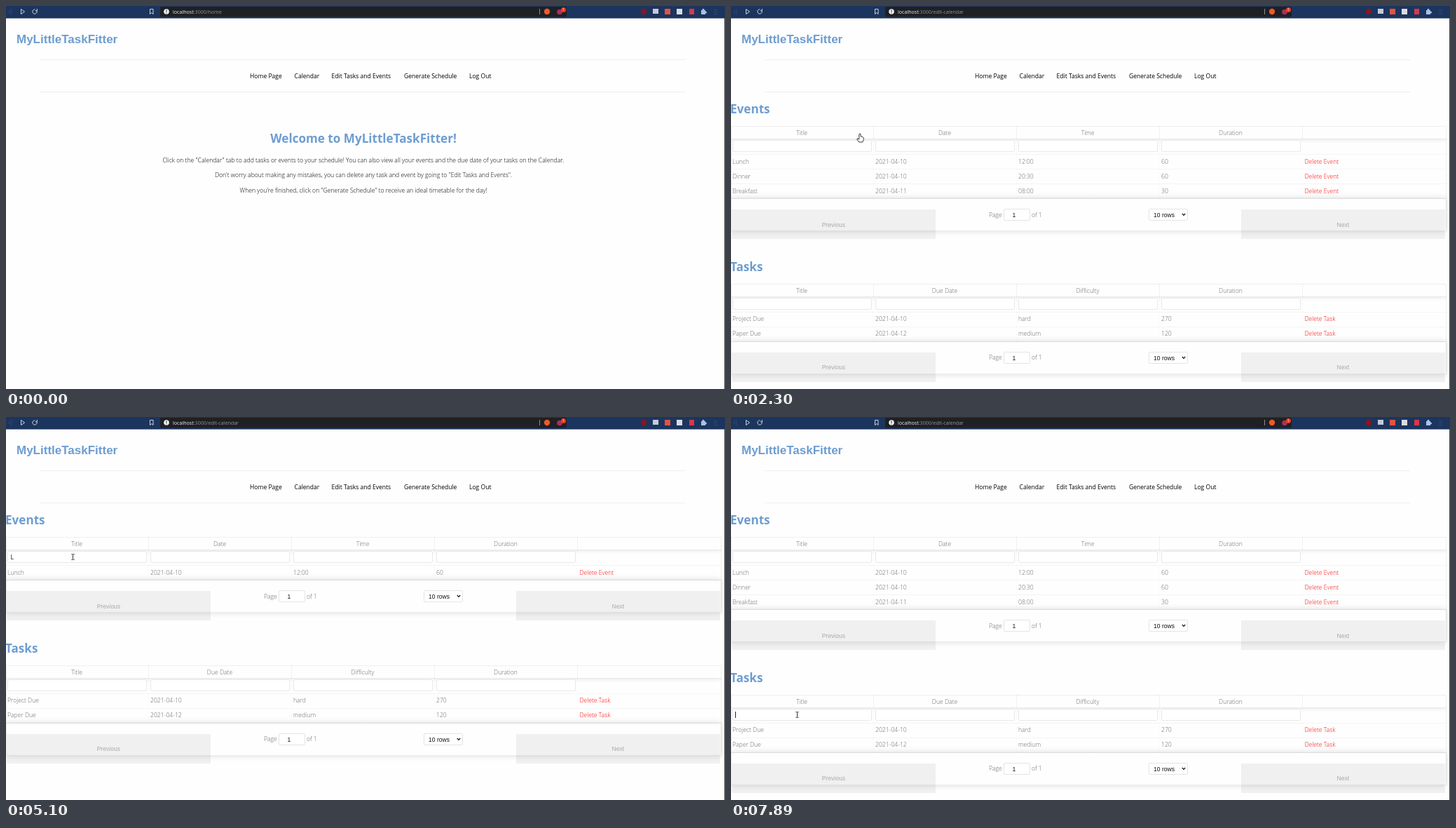
Recreate the animation shown at these times as an HTML page with a canvas. Size 1026x546 px, loop 8000 ms.

```html
<!DOCTYPE html>
<html lang="en">
<head>
<meta charset="utf-8">
<title>Scheduler</title>
<style>
  html, body { margin: 0; width: 100%; height: 100%; overflow: hidden; background: #fefefe; }
  canvas { display: block; width: 1026px; height: 546px; }
</style>
</head>
<body>
<canvas id="stage" width="1026" height="546"></canvas>
<script>
const ctx = document.getElementById('stage').getContext('2d');
const LOOP = 8000;
const BRAND = 'MyLittleTaskFitter';
const BLUE = '#6d9dd1', PAGE = '#fefefe', GREY = '#666';
const REGULAR = '8.55px "Open Sans", sans-serif';
const LIGHT = '300 8.6px "Open Sans", sans-serif';
const PARAGRAPH = '300 8.63px "Open Sans", sans-serif';
const HEADING = 'bold 17.1px "Open Sans", sans-serif';
const CONTROL = '8.55px "Liberation Sans", Arial, sans-serif';
const URL_FONT = '7.1px "Open Sans", sans-serif';
const COLS = [0, 204, 408, 612, 816];

const NAV = [
  ['Home Page', 348], ['Calendar', 411.5], ['Edit Tasks and Events', 464.5],
  ['Generate Schedule', 568], ['Log Out', 661]
];
const EVENTS = {
  heads: ['Title', 'Date', 'Time', 'Duration'],
  action: 'Delete Event',
  rows: [
    ['Lunch', '2021-04-10', '12:00', '60'],
    ['Dinner', '2021-04-10', '20:30', '60'],
    ['Breakfast', '2021-04-11', '08:00', '30']
  ]
};
const TASKS = {
  heads: ['Title', 'Due Date', 'Difficulty', 'Duration'],
  action: 'Delete Task',
  rows: [
    ['Project Due', '2021-04-10', 'hard', '270'],
    ['Paper Due', '2021-04-12', 'medium', '120']
  ]
};

// time, filter text, caret visible
const TYPING = [
  [0, '', 0], [3080, '', 1], [3620, '', 0], [3940, 'L', 1], [4170, 'Lu', 1],
  [4330, 'Lun', 1], [4400, 'Lunc', 1], [4790, 'Lun', 1], [4950, 'Lu', 0],
  [5100, 'L', 0], [5260, '', 0], [5490, 'B', 1], [5720, 'Br', 1],
  [5800, 'Bre', 1], [6030, 'Br', 1], [6190, 'B', 0], [6340, '', 0],
  [6890, '', 1], [7420, '', 0]
];

// start, end, steps, then three points of a curve
const MOVES = [
  [220, 820, 9, [1018, 538], [700, 190], [502, 91]],
  [1760, 2060, 5, [502, 91], [330, 150], [184, 185]],
  [2300, 2300, 1, [184, 185], [184, 183], [184, 182]],
  [2450, 2760, 5, [184, 182], [140, 196], [96, 197]],
  [3080, 3150, 2, [96, 197], [98, 196], [95, 199]],
  [7190, 7890, 10, [95, 199], [143, 500], [94, 424]]
];

function rect(x, y, w, h, color) {
  ctx.fillStyle = color;
  ctx.fillRect(x, y, w, h);
}
function frame(x, y, w, h, color, radius = 0) {
  ctx.beginPath();
  ctx.roundRect(x + .5, y + .5, w - 1, h - 1, radius);
  ctx.lineWidth = 1;
  ctx.strokeStyle = color;
  ctx.stroke();
}
function disc(x, y, r, color) {
  ctx.beginPath();
  ctx.arc(x, y, r, 0, Math.PI * 2);
  ctx.fillStyle = color;
  ctx.fill();
}
function line(points, color, width = 1, close = false, fill = null) {
  ctx.beginPath();
  points.forEach(([x, y]) => ctx.lineTo(x, y));
  if (close) ctx.closePath();
  if (fill) { ctx.fillStyle = fill; ctx.fill(); }
  ctx.lineWidth = width;
  ctx.strokeStyle = color;
  ctx.stroke();
}
function text(str, x, y, font, color, align = 'left') {
  ctx.font = font;
  ctx.fillStyle = color;
  ctx.textAlign = align;
  ctx.fillText(str, x, y);
}
function withShadow(blur, dy, alpha, draw) {
  ctx.save();
  ctx.shadowColor = `rgba(0,0,0,${alpha})`;
  ctx.shadowBlur = blur;
  ctx.shadowOffsetY = dy;
  draw();
  ctx.restore();
}

function drawBrowser(path) {
  rect(0, 0, 1026, 17.6, '#1c355e');
  line([[8, 4.5], [3.5, 8], [8, 11.5]], '#2f4872', 1, true);
  line([[21.5, 4.5], [26.5, 8], [21.5, 11.5]], '#c9d2e2', 1, true);
  ctx.beginPath();
  ctx.arc(41, 8, 3.2, -.5, 4.9);
  ctx.strokeStyle = '#c9d2e2';
  ctx.stroke();
  line([[44.4, 4], [44.4, 6.8], [41.8, 6.8]], '#c9d2e2');
  line([[205.5, 4.5], [210, 4.5], [210, 11.5], [207.8, 9.5], [205.5, 11.5]], '#c9d2e2', 1, true);

  ctx.beginPath();
  ctx.roundRect(220, 1, 580, 14.5, 2);
  ctx.fillStyle = '#1f2024';
  ctx.fill();
  disc(229, 8, 3.8, '#f2f2f2');
  rect(228.5, 5.5, 1, 3, '#1f2024');
  rect(228.5, 9.5, 1, 1, '#1f2024');
  text('localhost', 238, 10.6, URL_FONT, '#f0f0f0');
  const host = ctx.measureText('localhost').width;
  text(':3000' + path, 238 + host, 10.6, URL_FONT, '#929398');
  rect(761, 4, 1, 8, '#8d8e92');

  disc(772, 8, 4.2, '#f0582a');
  disc(790, 8.5, 3.8, '#a8305c');
  disc(795.5, 5.5, 3.5, '#f03c22');
  text('1', 795.5, 7.4, '5px "Open Sans", sans-serif', '#fff', 'center');

  disc(910, 8, 4, '#8c1420');
  rect(923, 4, 8, 7, '#c5cad7');
  rect(940, 4, 8, 8, '#e2533f');
  rect(957, 4, 8, 8, '#d9dce3');
  rect(975, 4, 7, 8, '#d7384a');
  rect(992, 6, 6, 6, '#a9c2e4');
  disc(995, 5.3, 1.5, '#a9c2e4');
  disc(998.5, 9, 1.5, '#a9c2e4');
  for (const y of [5, 8, 11]) rect(1010, y, 5, 1, '#304a74');
}

function drawHeader(hover) {
  text(BRAND, 15, 53, 'bold 17px "Liberation Sans", Arial, sans-serif', BLUE);
  rect(48, 76, 921, 1, '#eeeeee');
  rect(48, 122, 921, 1, '#eeeeee');
  if (hover) rect(456, 85, 103, 28, '#b8d6ea');
  for (const [label, x] of NAV) text(label, x, 102.8, REGULAR, '#000');
}

function drawHome() {
  text(`Welcome to ${BRAND}!`, 510, 195, HEADING, BLUE, 'center');
  [
    'Click on the "Calendar" tab to add tasks or events to your schedule! You can also view all your events and the due date of your tasks on the Calendar.',
    'Don\'t worry about making any mistakes, you can delete any task and event by going to "Edit Tasks and Events".',
    'When you\'re finished, click on "Generate Schedule" to receive an ideal timetable for the day!'
  ].forEach((p, i) => text(p, 510, 222.8 + i * 21.5, PARAGRAPH, '#000', 'center'));
}

function drawPager(top, y) {
  withShadow(8, 0, .14, () => rect(0, top, 1020, 47, PAGE));
  rect(0, top, 1020, 1, '#ececec');
  frame(0, top, 1021, 47, 'rgba(0,0,0,.07)');
  for (const [x, label] of [[1, 'Previous'], [728, 'Next']]) {
    rect(x, top + 16, 291, 42, 'rgba(0,0,0,.055)');
    text(label, x + 145.3, y + 40, CONTROL, '#a9a9a9', 'center');
  }
  text('Page', 368, y + 26.3, LIGHT, GREY);
  text('of 1', 429, y + 26.3, LIGHT, GREY);
  for (const [x, w] of [[389, 38], [596, 56]]) {
    rect(x, top + 15, w, 17, '#fff');
    frame(x, top + 15, w, 17, '#e4e4e4', 1.6);
  }
  text('1', 404, y + 26.5, CONTROL, '#111', 'center');
  text('10 rows', 603, y + 26.5, CONTROL, '#111');
  line([[643.8, top + 22], [646, top + 24.3], [648.2, top + 22]], '#111', 1.2);
}

// Edges snap to whole pixels, lettering keeps the exact offset.
function drawTable(data, rows, y, filter, caret) {
  const top = Math.round(y);
  const foot = top + 40 + rows.length * 21;
  ctx.save();
  ctx.beginPath();
  ctx.rect(0, top, 1021, foot - top);
  ctx.clip();
  withShadow(6, 1, .1, () => rect(0, top, 1021, 18.5, PAGE));
  ctx.restore();
  frame(0, top, 1021, foot - top + 1, 'rgba(0,0,0,.06)');
  rect(0, top + 18, 1021, 1, 'rgba(0,0,0,.05)');
  rect(0, top + 40, 1020, 1, 'rgba(0,0,0,.04)');

  data.heads.forEach((head, i) => {
    const x = COLS[i];
    rect(x + 203, top, 1, 19, 'rgba(0,0,0,.05)');
    rect(x + 203, top + 19, 1, foot - top - 19, 'rgba(0,0,0,.01)');
    text(head, x + 101, y + 13, LIGHT, GREY, 'center');
    rect(x + 2, top + 20, 199, 17, '#fff');
    frame(x + 2, top + 20, 199, 17, '#e8e8e8', 1.6);
  });
  text(filter, 6.5, y + 32, REGULAR, '#111');
  if (caret) {
    rect(Math.round(6.4 + ctx.measureText(filter).width), top + 24, 1, 9, '#222');
  }

  rows.forEach((row, r) => {
    const base = y + 53.8 + r * 21;
    if (r) rect(0, top + 40 + r * 21, 1020, 1, 'rgba(0,0,0,.04)');
    row.forEach((cell, i) => text(cell, COLS[i] + 2, base, LIGHT, GREY));
    text(data.action, 818.5, base, LIGHT, '#ff0000');
  });
  drawPager(foot, y + 40.5 + rows.length * 21);
}

function drawEditor(t) {
  const [, filter, caret] = TYPING.filter(k => k[0] <= t).pop();
  text('Events', -1, 153, HEADING, BLUE);
  if (t < 1390) {
    text('Tasks', -1, 228, HEADING, BLUE);
    return;
  }
  const rows = EVENTS.rows.filter(row => row[0].startsWith(filter));
  const shift = 161.5 + rows.length * 21;
  drawTable(EVENTS, rows, 171, filter, caret);
  text('Tasks', -1, 153 + shift, HEADING, BLUE);
  drawTable(TASKS, TASKS.rows, 171 + shift, '', t >= 7810);
}

function pointerAt(t) {
  const move = MOVES.filter(m => m[0] <= t).pop();
  if (!move) return null;
  const [start, end, steps, a, b, c] = move;
  const step = t >= end ? steps : 1 + Math.floor((t - start) / (end - start) * (steps - 1));
  const p = step / steps;
  const u = p * p * (3 - 2 * p), v = 1 - u;
  return [0, 1].map(i => a[i] * v * v + 2 * b[i] * u * v + c[i] * u * u);
}

function inside([x, y], left, top, right, bottom) {
  return x >= left && x < right && y >= top && y < bottom;
}

function drawPointer(pos, hover, t) {
  const [x, y] = pos.map(Math.round);
  const at = points => points.map(([dx, dy]) => [x + dx, y + dy]);
  const table = t >= 1390;
  if (table && (inside(pos, 2, 191, 201, 208) || inside(pos, 2, 416, 201, 433))) {
    rect(x, y - 4, 1, 9, '#333');
    rect(x - 2, y - 4, 5, 1, '#777');
    rect(x - 2, y + 4, 5, 1, '#777');
  } else if (hover || (table && inside(pos, 0, 171, 816, 190))) {
    line(at([[-1.2, .6], [0, 0], [1, .6], [1.2, 4], [3.8, 4.6], [5.2, 5.8],
      [5.2, 8.5], [3.8, 12], [-1.4, 12], [-4.2, 8], [-3.7, 6.8], [-1.2, 8]]),
      '#222', .9, true, '#fff');
  } else {
    line(at([[0, 0], [0, 9.2], [2.1, 7.3], [3.5, 10.4], [4.9, 9.8], [3.5, 6.8], [6.4, 6.6]]),
      '#222', .8, true, '#fff');
  }
}

function draw() {
  const t = performance.now() % LOOP;
  const pos = pointerAt(t);
  const hover = pos && inside(pos, 456, 85, 559, 113);
  rect(0, 0, 1026, 546, PAGE);
  drawHeader(hover);
  if (t < 1290) drawHome();
  else drawEditor(t);
  drawBrowser(t < 1390 ? '/home' : '/edit-calendar');
  rect(1025, 17, 1, 529, '#4a4a4a');
  if (pos) drawPointer(pos, hover, t);
  requestAnimationFrame(draw);
}
draw();
</script>
</body>
</html>
```
